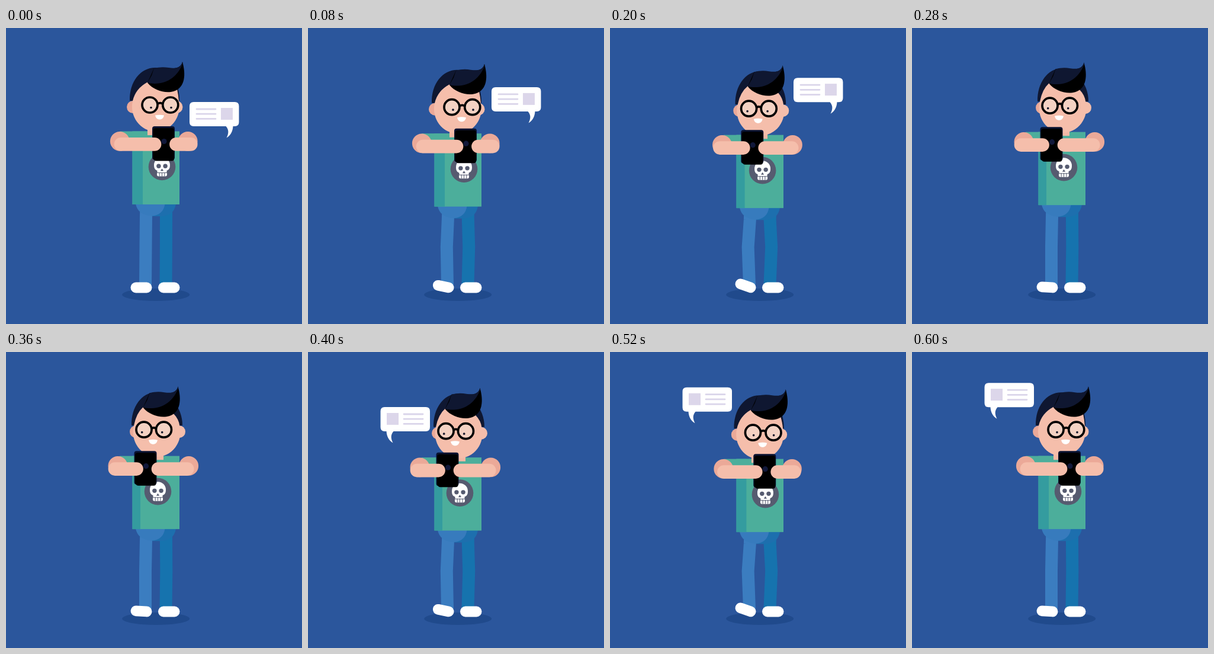
Recreate the animation shown at these times as an HTML page. Size 500 by 500 pixels, loop 640 ms.

```html
<!DOCTYPE html>
<html lang="en">
<head>
<meta charset="utf-8">
<title>Texting</title>
<style>
  html, body { margin: 0; width: 100%; height: 100%; overflow: hidden; background: #2b569c; }
  svg { display: block; width: 100%; height: 100%; }
</style>
</head>
<body>
<svg viewBox="0 0 500 500">
  <defs>
    <g id="bubble">
      <path fill="#fff" d="M317 0H386.500Q393.500 0 393.500 7V34Q393.500 41 386.500 41H383.500C383 49 380 56 372.500 60.500C376 54 377 47 371.500 41H317Q310 41 310 34V7Q310 0 317 0Z"/>
      <path stroke="#dad5ea" stroke-width="2.800" stroke-linecap="round" d="M322 12H354M322 20.200H354M322 28.400H354"/>
      <rect x="363" y="10" width="20" height="20" fill="#dcd6ea"/>
    </g>
  </defs>

  <ellipse cx="253.200" cy="450.500" rx="57" ry="10.500" fill="#204a8c"/>

  <g fill="none" stroke-width="21" stroke-linejoin="round">
    <path id="legR" stroke="#1673ae"/>
    <path id="legL" stroke="#3b7dc0"/>
  </g>
  <g fill="#fff">
    <rect id="footL" x="210.500" y="429.600" width="36" height="17.800" rx="8.900"/>
    <rect x="257" y="429.600" width="36.500" height="17.800" rx="8.900"/>
  </g>

  <g id="upper">
    <path fill="#1d6fae" d="M238 297H287C286 304 283 309 279 313Q270 318 262 318H247Z"/>
    <path fill="#377bbd" d="M219 297H268.500C267 309 259 317 246 317.500C231 317 221 309 219 297Z"/>
    <rect x="213.500" y="174.500" width="79.500" height="123.500" fill="#4cae9b"/>
    <rect id="side" x="213.500" y="174.500" height="123.500" fill="#349c9f"/>
    <rect x="192" y="174.500" width="48" height="14" fill="#4cae9b"/>
    <rect x="239" y="155" width="27" height="26" fill="#f3b8a5"/>

    <g id="skull">
      <circle r="22.800" fill="#565b70"/>
      <path fill="#fff" d="M-13.500-3A13.500 13.500 0 0 1 13.500-3C13.500 2 12 5 8 6.500V9.500H-8V6.500C-12 5-13.500 2-13.500-3Z"/>
      <path fill="#fff" d="M-8.500 10.500H8.500V13Q8.500 16 6 16H-6Q-8.500 16-8.500 13Z"/>
      <path fill="none" stroke="#565b70" stroke-width="1" d="M-4.300 9.500V16M0 9.500V16M4.300 9.500V16"/>
      <g fill="#565b70">
        <circle cx="-5.600" cy="-1.300" r="3.700"/>
        <circle cx="5.600" cy="-1.300" r="3.700"/>
        <path d="M0 3L2.600 7H-2.600Z"/>
      </g>
    </g>

    <circle id="earL" cy="133.500" r="10.500" fill="#eba998"/>
    <circle id="earR" cy="133.500" r="10.500" fill="#f5beab"/>
    <path id="cap" fill="#0f1731"/>
    <path id="face" fill="#f5beab"/>
    <g id="quiff">
      <path d="M239 92.500C250 106 270 111 283 107C303 101 304 78 298 57C296 66 288 69 278 68L250 68Z"/>
      <path fill="#0f1731" d="M239 92.500C258 97 286 92 298.500 60L298 57C296 67 288 69 275 67Q262 65 250 68L246 80Z"/>
    </g>
    <path id="smile" fill="#fff" d="M252 147.500Q259.500 145.800 267 147.500C266 152 263.500 154.500 259.500 154.500S253 152 252 147.500Z"/>
    <g id="lenses" fill="#f4d2c3" stroke="#000" stroke-width="3.700">
      <circle id="lensL" cy="130" r="13"/>
      <circle id="lensR" cy="130" r="13"/>
      <path id="bridge" fill="none"/>
    </g>
    <g id="pupils" fill="#15182c">
      <circle cx="245" cy="134.500" r="1.800"/>
      <circle cx="279" cy="134.500" r="1.800"/>
    </g>

    <circle id="shoulderL" cy="191.300" r="16.400" fill="#eba998"/>
    <circle id="shoulderR" cy="191.300" r="16.400" fill="#eba998"/>
    <g id="phone">
      <rect x="250" y="169" width="34" height="55.500" rx="4"/>
      <rect x="247" y="166" width="38" height="56.500" rx="4" fill="#091230"/>
      <rect x="248.500" y="169" width="35.500" height="54" rx="4"/>
      <circle cx="267" cy="191.500" r="4.600" fill="#11183a"/>
    </g>
    <g fill="none" stroke="#f5beab" stroke-width="22.700" stroke-linecap="round">
      <path id="armL"/>
      <path id="armR"/>
    </g>
  </g>

  <use id="bubbleR" href="#bubble"/>
  <use id="bubbleL" href="#bubble"/>
</svg>

<script>
const LOOP = 640, STEP = 40;
const el = {};
document.querySelectorAll('[id]').forEach(node => el[node.id] = node);

const set = (id, name, value) => el[id].setAttribute(name, value);
const shift = (id, x, y = 0) => set(id, 'transform', `translate(${x} ${y})`);
const ease = u => { u = Math.min(1, Math.max(0, u)); return u * u * (3 - 2 * u); };

function drawBubble(id, age, top, mirrored) {
  const visible = age >= 0 && age < 240;
  set(id, 'visibility', visible ? 'visible' : 'hidden');
  if (!visible) return;
  const left = Math.max(0, 1 - age / 212);
  const y = top + 41 * left * left;
  set(id, 'transform', mirrored ? `matrix(-1 0 0 1 516 ${y})` : `translate(0 ${y})`);
}

// turn: 0 faces right, 1 faces left; dip: 0 standing, 1 knees bent
function render(t) {
  const turn = ease((t - 80) / 160) - ease((t - 400) / 160);
  const half = t % 320;
  const dip = ease(1 - Math.abs(half - 160) / 160);
  const drop = 7.3 * dip;

  shift('upper', 0, drop);
  set('legL', 'd', `M237 ${300 + drop}L${236.5 - 0.2 * dip} ${318 + drop}L${236 - 3.4 * dip} 370L235.5 434`);
  set('legR', 'd', `M270.5 ${300 + drop}L${270.5 - 0.4 * dip} ${318 + drop}L${270.4 + 2.7 * dip} 370L270 434`);
  set('footL', 'transform', `rotate(${23 * dip} 238 438.5)`);

  set('side', 'width', 17.5 - 4 * turn);
  shift('skull', 263.5 - 7 * turn, 234.5);

  set('earL', 'cx', 214.5 + 5 * turn);
  set('earR', 'cx', 288 + 4.5 * turn);
  const l = 209 + 3 * turn, r = 293 + 5 * turn;
  set('cap', 'd', `M${l} 123C${l - 1} 91 ${l + 18} 67 252 67S${r} 90 ${r} 123Z`);
  const edgeL = 214 + 2 * turn, edgeR = 292 + 1.5 * turn;
  set('face', 'd', `M${edgeL} 123Q${219 + turn} 102 ${239 - 7 * turn} 91.5
    L${289 - 6 * turn} 103Q${291 + turn} 112 ${edgeR} 124A40 42 0 1 1 ${edgeL} 123Z`);
  shift('quiff', -7.5 * turn);
  shift('smile', -11 * turn);
  shift('pupils', -15.3 * turn);
  const lensL = 243 - 10 * turn, lensR = 277.8 - 11.3 * turn;
  set('lensL', 'cx', lensL);
  set('lensR', 'cx', lensR);
  set('bridge', 'd', `M${lensL + 13} 128.4Q${(lensL + lensR) / 2} 125 ${lensR - 13} 128.4`);

  const sway = -30.5 * turn;
  shift('phone', sway);
  set('shoulderL', 'cx', 192.3 - 3.4 * turn);
  set('shoulderR', 'cx', 307.2 + 1.5 * turn);
  set('armL', 'd', `M${194 - 10 * turn} 196.4H${251 + sway}`);
  set('armR', 'd', `M${312.2 - 6 * turn} 196.4H${287.5 + sway}`);

  drawBubble('bubbleR', t, 84, false);
  drawBubble('bubbleL', t - 400, 52, true);
}

const start = performance.now();
function tick() {
  const t = (performance.now() - start) % LOOP;
  render(Math.floor(t / STEP) * STEP);
  requestAnimationFrame(tick);
}
tick();
</script>
</body>
</html>
```
